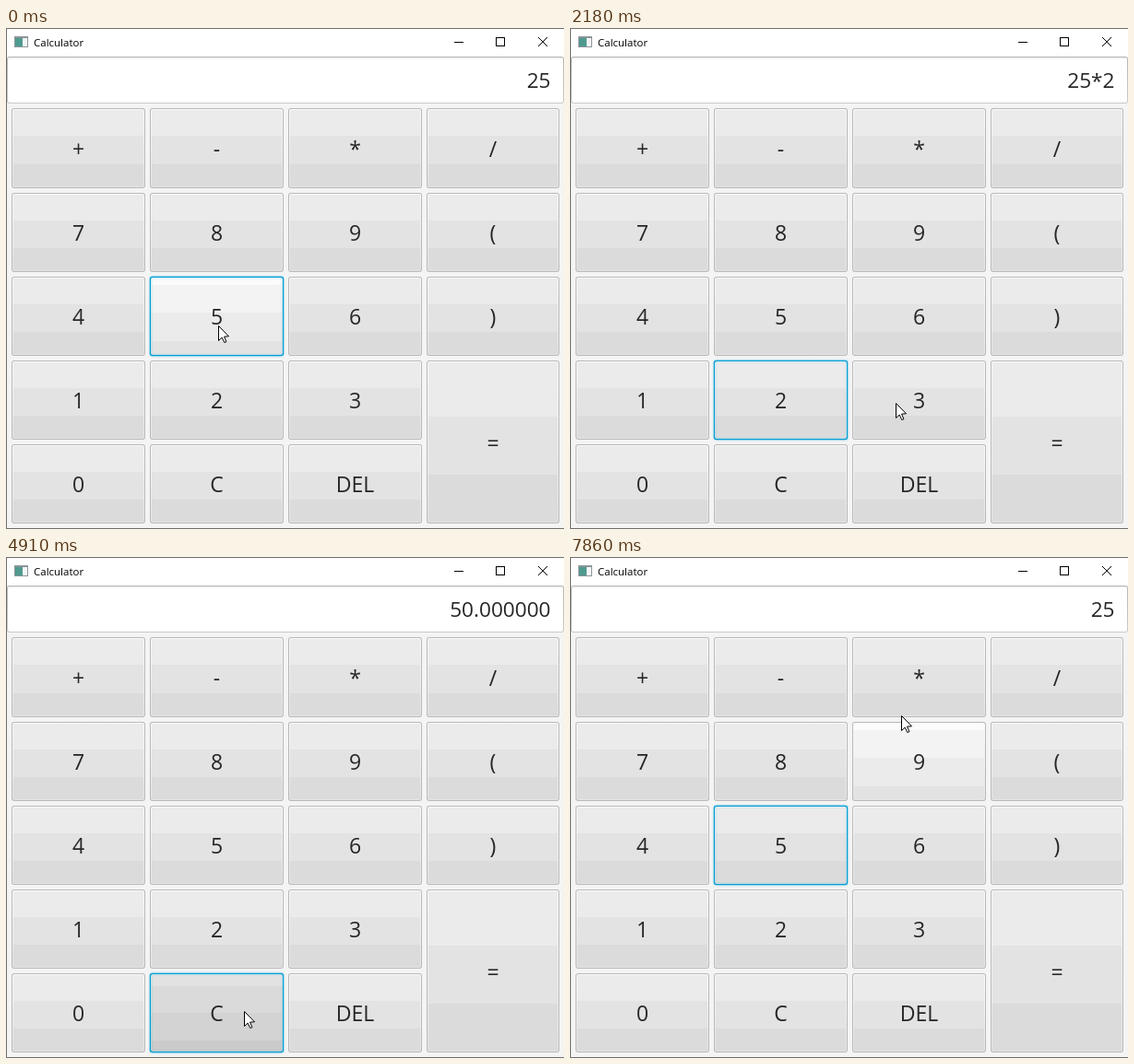
Animation of 605x544 px, one loop 8000 ms. Source, as an HTML page with a canvas:

```html
<!DOCTYPE html>
<html lang="en">
<head>
<meta charset="utf-8">
<title>Calculator</title>
<style>
  html, body { margin: 0; width: 100%; height: 100%; overflow: hidden; background: #f4f4f4; }
  canvas { display: block; width: 605px; height: 544px; }
</style>
</head>
<body>
<canvas id="stage" width="605" height="544"></canvas>
<script>
const ctx = document.getElementById('stage').getContext('2d');
const LOOP = 8000;
const STEP = 120; // time between pointer positions
const HOLD = 120; // how long a key stays down
const INK = '#262626';
const FONT = '"Open Sans", "Noto Sans", sans-serif';

const ROWS = ['+ - * /', '7 8 9 (', '4 5 6 )', '1 2 3 =', '0 C DEL'];
const buttons = ROWS.flatMap((row, r) => row.split(' ').map((label, c) => ({
  label,
  x: 6 + 150 * c,
  y: r ? 88 + 91 * r : 87,
  w: c === 3 ? 144 : 145,
  h: label === '=' ? 177 : r ? 86 : 87
})));

// Bands of a key face: start as a share of the height, grey level.
const LOOKS = {
  normal: [[0, 235], [0.345, 227], [0.7, 219]],
  hover: [[0, 251], [0.1, 243], [0.45, 235], [0.81, 227]],
  pressed: [[0, 226], [0.16, 218], [0.5, 211], [0.85, 203]]
};

// Pointer strokes: start, number of steps, end point. No point hides it.
const STROKES = [
  [0, 1, 230, 323], [120, 4, 377, 139], [1120, 4, 251, 407],
  [2030, 5, 506, 408], [2690, 2, 525, 247], [2960, 2, 541, 441], [3590],
  [4550, 1, 440, 510], [4670, 2, 258, 493], [5160],
  [5440, 1, 194, 470], [5590, 2, 204, 369], [6020, 2, 218, 417],
  [7080, 4, 230, 323], [7860, 1, 359, 172]
];

// Visits to keys: label, enter, press, leave.
const VISITS = [
  ['5', -240, -120, 120],
  ['*', 660, 660, 1120],
  ['2', 1630, 1760, 2180],
  ['=', 3080, 3320, 3590],
  ['C', 4790, 4910, 5160],
  ['2', 6710, 6710, 7200],
  ['5', 7590, 7590, 7860],
  ['9', 7860, LOOP, LOOP]
];

function enterKey(text, key) {
  if (key === 'C') return '';
  if (key === '=') return text.split('*').reduce((a, b) => a * b).toFixed(6);
  return text + key;
}

function stateAt(t) {
  const visit = VISITS.find(([, enter, , leave]) => enter <= t && t < leave);
  const pressed = VISITS.filter(([, , press]) => press <= t);
  const [focus, , lastPress] = pressed.at(-1);
  return {
    focus,
    hover: visit?.[0],
    down: t < lastPress + HOLD,
    text: pressed.filter(([, , press]) => press + HOLD <= t)
      .reduce((text, [key]) => enterKey(text, key), '2')
  };
}

function pointerAt(t) {
  const i = STROKES.findLastIndex(([start]) => start <= t);
  const [start, steps, x, y] = STROKES[i];
  if (x === undefined) return null;
  const [, , fromX = x, fromY = y] = STROKES[i - 1] ?? [];
  const done = Math.min(steps, Math.floor((t - start) / STEP) + 1) / steps;
  return [Math.round(fromX + (x - fromX) * done), Math.round(fromY + (y - fromY) * done)];
}

function box(x, y, w, h, color) {
  ctx.fillStyle = color;
  ctx.fillRect(x, y, w, h);
}

function roundBox(b, inset, radius, fill) {
  ctx.beginPath();
  ctx.roundRect(b.x + inset, b.y + inset, b.w - 2 * inset, b.h - 2 * inset, radius);
  ctx.fillStyle = fill;
  ctx.fill();
}

function text(str, x, y, size, align, color) {
  ctx.font = `${size}px ${FONT}`;
  ctx.textAlign = align;
  ctx.fillStyle = color;
  ctx.fillText(str, x, y);
}

function grey(level) {
  return `rgb(${level}, ${level}, ${level})`;
}

function bandFill(b, bands) {
  const g = ctx.createLinearGradient(0, b.y, 0, b.y + b.h);
  bands.forEach(([at, level], i) => {
    const start = Math.round(at * b.h) / b.h;
    if (i) g.addColorStop(start, grey(bands[i - 1][1]));
    g.addColorStop(start, grey(level));
  });
  return g;
}

function verticalFill(b, top, bottom) {
  const g = ctx.createLinearGradient(0, b.y, 0, b.y + b.h);
  g.addColorStop(0, grey(top));
  g.addColorStop(1, grey(bottom));
  return g;
}

function drawButton(b, state) {
  const hot = b.label === state.hover;
  const look = hot ? (state.down ? 'pressed' : 'hover') : 'normal';
  const focused = b.label === state.focus;
  const body = bandFill(b, LOOKS[look]);
  const rim = look === 'pressed' ? verticalFill(b, 236, 212) : verticalFill(b, 250, 228);
  roundBox(b, focused ? -0.2 : 0, 3, focused ? '#039ed3' : '#b9b9b9');
  roundBox(b, 1, 2, rim);
  roundBox(b, 2, 1, body);
  if (focused) {
    roundBox(b, -1.4, 4, '#039ed322');
    roundBox(b, 2.6, 1, body);
  }
  text(b.label, b.x + b.w / 2, Math.round(b.y + b.h / 2 + 9), 23, 'center', INK);
}

function line(...points) {
  ctx.beginPath();
  points.forEach(([x, y]) => ctx.lineTo(x, y));
}

function drawWindow() {
  box(0, 0, 605, 544, '#6e6e6e');
  box(1, 1, 604, 542, '#f4f4f4');
  box(1, 1, 604, 30, '#fff');

  box(9, 9, 15, 12, '#8c9499');
  box(10, 11, 13, 9, '#f4f6f6');
  box(10, 11, 8, 9, '#4f9a8f');
  text('Calculator', 30, 20, 11.5, 'left', '#000');

  ctx.strokeStyle = '#000';
  ctx.lineWidth = 1;
  line([486, 15.5], [496, 15.5]);
  ctx.stroke();
  ctx.strokeRect(531.5, 10.5, 9, 9);
  line([577, 10], [587, 20]);
  ctx.stroke();
  line([587, 10], [577, 20]);
  ctx.stroke();
}

function drawDisplay(value) {
  const field = { x: 1, y: 31, w: 604, h: 51 };
  roundBox(field, 0, 3, verticalFill(field, 182, 202));
  roundBox(field, 1, 2, '#fff');
  box(3, 32, 600, 1, '#ececec');
  box(3, 33, 600, 1, '#f8f8f8');
  text(value, 590.5, 65, 22.6, 'right', INK);
}

function drawPointer([x, y]) {
  ctx.save();
  ctx.translate(x + 0.5, y + 0.5);
  line([0, 0], [0, 16], [3.7, 12.6], [6.3, 18], [8.4, 17.2], [6.1, 11.6], [11, 11.3]);
  ctx.closePath();
  ctx.fillStyle = '#fff';
  ctx.fill();
  ctx.strokeStyle = '#000';
  ctx.lineWidth = 1;
  ctx.stroke();
  ctx.restore();
}

function draw(t) {
  const state = stateAt(t);
  const pointer = pointerAt(t);
  drawWindow();
  drawDisplay(state.text);
  buttons.forEach(b => drawButton(b, state));
  if (pointer) drawPointer(pointer);
}

const begin = performance.now();
function tick() {
  draw((performance.now() - begin) % LOOP);
  requestAnimationFrame(tick);
}
tick();
</script>
</body>
</html>
```
